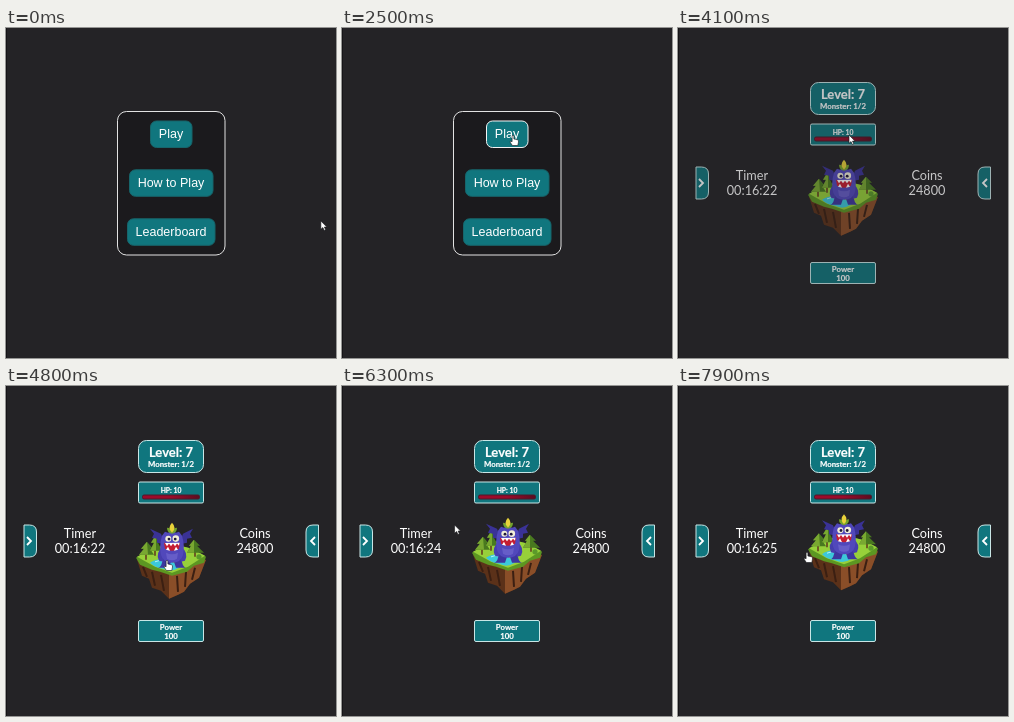
These frames come from a looping animation (330 by 330 pixels, 8000 ms). An HTML page:

```html
<!DOCTYPE html>
<html lang="en">
<head>
<meta charset="utf-8">
<title>Monster clicker</title>
<style>
html, body { margin: 0; width: 100%; height: 100%; overflow: hidden; background: #242326; }
svg { display: block; width: 330px; height: 330px; }
text { fill: #fff; text-anchor: middle; }
#menu text { font: 12.5px "Liberation Sans", Arial, sans-serif; }
#game text { font: 12.7px Lato, sans-serif; }
#game .bold text { font-weight: 700; stroke: #fff; stroke-width: .2; }
.button { fill: #10767e; stroke: #17656b; }
.button.hover { stroke: #f4f4f4; }
.box { fill: #10767e; stroke: #c9e6e6; }
.chevron { fill: none; stroke: #fff; stroke-width: 1.8; }
</style>
</head>
<body>
<svg viewBox="0 0 330 330">
  <defs>
    <linearGradient id="blood">
      <stop offset=".5" stop-color="#9c0a2a"/>
      <stop offset="1" stop-color="#5c0c20"/>
    </linearGradient>
  </defs>
  <rect width="330" height="330" fill="#242326"/>
  <rect width="1" height="330" fill="#151417"/>

  <g id="menu">
    <rect x="111.5" y="83.5" width="107.5" height="143.5" rx="9" fill="#1b1a1d" stroke="#e2e2e2"/>
    <rect class="button" x="144.5" y="93" width="41.5" height="26.5" rx="6"/>
    <rect class="button" x="123.5" y="141.8" width="83.5" height="26.5" rx="6"/>
    <rect class="button" x="121.5" y="190.8" width="87.5" height="26.5" rx="6"/>
    <text x="165" y="110">Play</text>
    <text x="165" y="159">How to Play</text>
    <text x="165" y="208">Leaderboard</text>
  </g>

  <g id="game">
    <g class="bold">
      <rect class="box" x="132.5" y="54.5" width="65" height="32" rx="8"/>
      <text x="165" y="71" style="font-size:13px">Level: 7</text>
      <text x="165" y="81.3" style="font-size:7.8px">Monster: 1/2</text>
      <rect class="box" x="132.5" y="96" width="65" height="21" rx="1.5"/>
      <text x="165" y="106.7" style="font-size:6.8px">HP: 10</text>
      <rect x="136.5" y="109" width="57" height="4" rx="1.5" fill="url(#blood)" stroke="#4a1a2a"/>
      <rect class="box" x="132.5" y="234.5" width="65" height="21" rx="1.5"/>
      <text x="165" y="243.5" style="font-size:7.8px">Power</text>
      <text x="165" y="253" style="font-size:7.8px">100</text>
    </g>
    <text x="74" y="152.3">Timer</text>
    <text id="timer" x="74" y="167.2"></text>
    <text x="249" y="152.3">Coins</text>
    <text x="249" y="167.2">24800</text>
    <path class="box" d="M18 139H23.5Q30.5 139 30.5 146V164Q30.5 171 23.5 171H18Z"/>
    <path class="box" d="M312.5 139H307Q300 139 300 146V164Q300 171 307 171H312.5Z"/>
    <path class="chevron" d="M21 151L25 155L21 159M309 151L305 155L309 159"/>

    <g id="floating">
      <path d="M131 174L136 190L143 193L146 202L155 205L163 213L172 209L178 206L184 198L193 192L200 174Z" fill="#5b3119"/>
      <path d="M163 186L163 213L172 209L178 206L184 198L193 192L200 174Z" fill="#8a4e28"/>
      <path d="M137 181L141 191M146 186L149 200M155 189L158 205M171 190L172 206M180 186L179 201M189 182L186 194" stroke="#3b1f12" stroke-width="2"/>
      <path d="M130 172L146 163L166 158L186 163L200 171L198 177L188 180L181 186L166 190L154 186L146 184L134 179Z" fill="#5c9722"/>
      <path d="M131 171L146 163L166 158L186 163L199 170L182 181L166 187L149 181Z" fill="#97d03a"/>
      <path d="M144 177Q152 171 163 175T173 182Q165 187 157 183Q149 182 144 177Z" fill="#3cc8da"/>
      <path d="M149 176Q154 173 159 176" fill="none" stroke="#b5f5f7"/>
      <path d="M140 167V174M149 163V170M189 165V171" stroke="#65401f" stroke-width="1.6"/>
      <path d="M141 156L147 163H144L148 169H133L138 163H135ZM150 149L155 157H152L156 165H144L148 157H145ZM188 154L194 160H191L198 167H181L185 160H183Z" fill="#49791f"/>
      <path d="M141 156L142 169H133L138 163H135ZM150 149L150 165H144L148 157H145ZM188 154L188 167H181L185 160H183Z" fill="#79a831"/>
      <circle cx="193" cy="171" r="2.6" fill="#5b9a2a"/>

      <g fill="#3a3296">
        <path d="M159 158L155 148L144 143L148 148L146 152L151 153L151 157L156 158Z"/>
        <path d="M173 158L177 148L187 143L184 148L186 152L181 153L181 157L176 158Z"/>
      </g>
      <path d="M157 171Q156 182 152 182H163L165 176H168L170 182H180Q176 181 175 171Z" fill="#3d369e"/>
      <path d="M157 161Q149 167 153 175L157 176L159 167ZM175 161Q183 167 179 175L175 176L173 167Z" fill="#463eac"/>
      <path d="M156 150L159 146L162 147Q166 144 170 147L173 146L176 150Q179 160 177 169Q175 177 166 177T155 169Q153 160 156 150Z" fill="#5148bb"/>
      <path d="M160 167Q166 170 172 167L171 173Q166 176 161 173Z" fill="#665dc8"/>
      <path d="M161 142Q165 142 166 147Q167 142 171 142Q171 147 166 148Q161 147 161 142Z" fill="#74a42c"/>
      <path d="M166 137Q171 142 166 147Q161 142 166 137Z" fill="#e8d23a"/>
      <circle cx="162.3" cy="153" r="3" fill="#f3f0d8"/>
      <circle cx="169.8" cy="152.8" r="3.3" fill="#f3f0d8"/>
      <circle cx="163" cy="153.3" r="1.4" fill="#20183c"/>
      <circle cx="169.2" cy="153.3" r="1.4" fill="#20183c"/>
      <path d="M158 157Q166 159 174 157L173 163Q166 167 159 163Z" fill="#c51d32"/>
      <path d="M159 157.2L161 160.5L163 157.8L165 160.5L167 157.8L169 160.5L171 157.8L173 160L173.5 157ZM160 164L162 161L164 165ZM168 165L170 161L172 164Z" fill="#fff"/>
    </g>
  </g>

  <g id="cursor" fill="#fff" stroke="#17171a" stroke-width=".6">
    <path id="arrow" d="M0 0V8.3L2 6.6L3.4 9.5L4.8 8.9L3.5 6.1H6Z"/>
    <path id="hand" d="M-.9 .8Q0 -.5 .9 .8V4L4.5 4.8Q5.8 5.2 5.5 7L4.8 10.5H-.6L-3 7Q-3.2 5.6 -.9 6.7Z"/>
  </g>
</svg>
<script>
const LOOP = 8000;
const $ = id => document.getElementById(id);
const buttons = [...document.querySelectorAll('.button')];
const show = (el, on) => el.style.display = on ? '' : 'none';
const clamp = v => Math.max(0, Math.min(1, v));

// time, x, y
const path = [
  [0, 315, 193], [100, 300, 188], [200, 240, 172], [300, 185, 155],
  [400, 178, 112], [500, 241, 147], [1350, 241, 147], [1800, 215, 128],
  [2200, 178, 107], [2350, 178, 107], [2500, 171, 107], [4300, 171, 107],
  [4700, 161, 174], [5000, 161, 174], [5500, 183, 108], [5700, 184, 105],
  [6200, 105, 120], [6600, 135, 195], [7000, 247, 160], [7400, 205, 130],
  [7900, 129, 166], [8000, 129, 166]
];

function cursorAt(t) {
  const i = path.findIndex(p => p[0] > t);
  const [t0, x0, y0] = path[i - 1], [t1, x1, y1] = path[i];
  const k = (t - t0) / (t1 - t0);
  return [x0 + (x1 - x0) * k, y0 + (y1 - y0) * k];
}

function inside(x, y, left, top, width, height) {
  return x >= left && x <= left + width && y >= top && y <= top + height;
}

function draw(now) {
  const t = now % LOOP;
  const [x, y] = cursorAt(t);
  const inMenu = t < 3000;
  let hand = t >= 3000 && t < 3200;

  for (const b of buttons) {
    const hover = inside(x, y, ...['x', 'y', 'width', 'height'].map(a => +b.getAttribute(a)));
    b.classList.toggle('hover', hover);
    hand ||= inMenu && hover;
  }
  hand ||= t > 4300 && inside(x, y, 127, 128, 76, 86);

  show($('menu'), inMenu);
  show($('game'), t >= 3600);
  $('game').style.opacity = clamp(.18 + (t - 3600) / 900);
  $('timer').textContent = t < 3960 ? '00:00:00' : '00:16:' + (23 + Math.floor((t - 4960) / 1000));

  const lift = 4.5 + 4.5 * Math.cos((t - 5800) / 2200 * 2 * Math.PI);
  $('floating').setAttribute('transform', `translate(0 ${-lift})`);

  $('cursor').setAttribute('transform', `translate(${x} ${y})`);
  show($('hand'), hand);
  show($('arrow'), !hand);
}

const start = performance.now();
function tick() {
  draw(performance.now() - start);
  requestAnimationFrame(tick);
}
tick();
</script>
</body>
</html>
```
